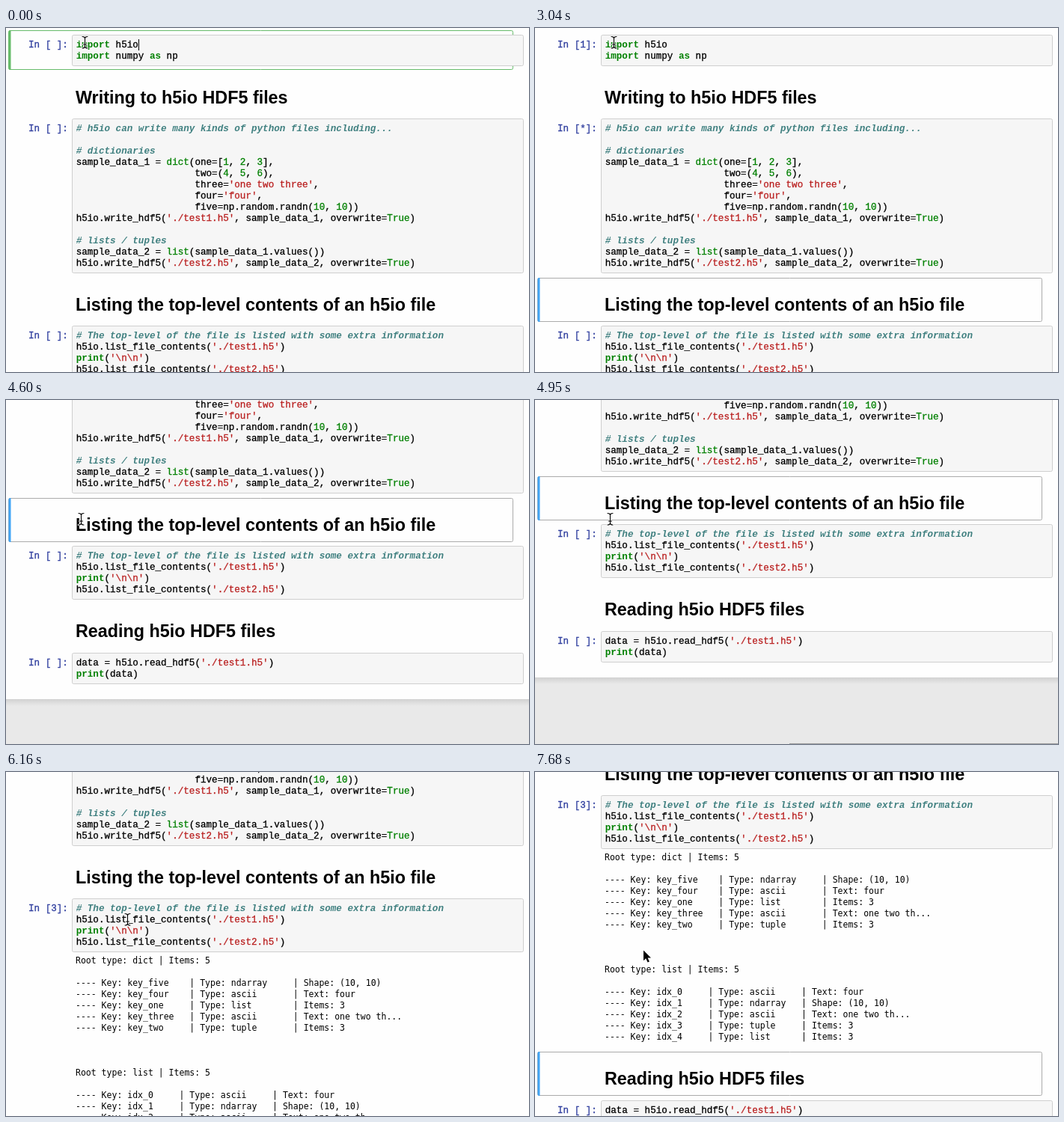
Write an HTML page with a canvas that moves like this. It is 699x460 px and loops after 8000 ms.

```html
<!DOCTYPE html>
<html lang="en">
<head>
<meta charset="utf-8">
<title>Notebook session</title>
<style>
  html, body { margin: 0; width: 100%; height: 100%; overflow: hidden; background: #fff; }
  canvas { display: block; }
</style>
</head>
<body>
<canvas id="stage" width="699" height="460"></canvas>
<script>
const ctx = document.getElementById('stage').getContext('2d');
const W = 699, H = 460, LOOP = 8000;
const LINE = 15, TEXT_X = 93, CODE_X = 93.7, PROMPT_X = 30;
const CODE = '12.6px "Liberation Mono", "Courier New", monospace';
const OUTPUT = '11.5px "DejaVu Sans Mono", monospace';
const HEADING = 'bold 23.35px "Liberation Sans", Arial, sans-serif';
const COMMAND = { bar: '#42a5f5', border: '#ababab' };
const EDIT = { bar: '#66bb6a', border: '#66bb6a' };

// Notebook content; tops and baselines are document coordinates.
const cells = [
  { top: 3, base: 26, code: String.raw`import h5io
import numpy as np` },
  { top: 56, base: 101, title: 'Writing to h5io HDF5 files' },
  { top: 115, base: 138, code: String.raw`# h5io can write many kinds of python files including...

# dictionaries
sample_data_1 = dict(one=[1, 2, 3],
                     two=(4, 5, 6),
                     three='one two three',
                     four='four',
                     five=np.random.randn(10, 10))
h5io.write_hdf5('./test1.h5', sample_data_1, overwrite=True)

# lists / tuples
sample_data_2 = list(sample_data_1.values())
h5io.write_hdf5('./test2.h5', sample_data_2, overwrite=True)` },
  { top: 334, base: 378, title: 'Listing the top-level contents of an h5io file' },
  { top: 393, base: 415, code: String.raw`# The top-level of the file is listed with some extra information
h5io.list_file_contents('./test1.h5')
print('\n\n')
h5io.list_file_contents('./test2.h5')` },
  { top: 476, base: 520, title: 'Reading h5io HDF5 files' },
  { top: 535, base: 558, code: String.raw`data = h5io.read_hdf5('./test1.h5')
print(data)` }
];
const LISTING = 4, PAGE_END = 603, FOOT_LINE = 691;
const OUTPUT_BASE = 485, OUTPUT_HEIGHT = 265;

const table = (rows, keyWidth, typeWidth) => rows.map(([key, type, info]) =>
  `---- Key: ${key}`.padEnd(keyWidth) + `| Type: ${type}`.padEnd(typeWidth) + `| ${info}`);

const output = [
  'Root type: dict | Items: 5', '',
  ...table([
    ['key_five', 'ndarray', 'Shape: (10, 10)'],
    ['key_four', 'ascii', 'Text: four'],
    ['key_one', 'list', 'Items: 3'],
    ['key_three', 'ascii', 'Text: one two th...'],
    ['key_two', 'tuple', 'Items: 3']
  ], 22, 20),
  '', '', '',
  'Root type: list | Items: 5', '',
  ...table([
    ['idx_0', 'ascii', 'Text: four'],
    ['idx_1', 'ndarray', 'Shape: (10, 10)'],
    ['idx_2', 'ascii', 'Text: one two th...'],
    ['idx_3', 'tuple', 'Items: 3'],
    ['idx_4', 'list', 'Items: 3']
  ], 20, 18)
];

// Timelines: each value holds until the next time.
const scrollSteps = [
  [0, 0], [4080, 5], [4220, 65], [4310, 131], [4430, 177], [4520, 203], [4610, 220],
  [4700, 230], [4790, 234], [4880, 233], [4950, 232], [5070, 231], [5210, 230], [5360, 229],
  [6700, 239], [6790, 284], [6880, 331], [6970, 358], [7050, 367]
];
const selectionSteps = [
  [0, [0, EDIT]], [1100, [1, COMMAND]], [2230, [2, COMMAND]], [3040, [3, COMMAND]],
  [5500, [4, EDIT]], [5980, [5, COMMAND]]
];
const promptSteps = {
  0: [[0, ' '], [1100, '*'], [1370, '1']],
  2: [[0, ' '], [3040, '*'], [3280, '2']],
  4: [[0, ' '], [5980, '*'], [6160, '3']],
  6: [[0, ' ']]
};
const caretSteps = [[0, true], [180, false], [690, true], [1100, false]];
const outputSteps = [[0, false], [6070, true]];
const pointerSteps = [
  [0, [105, 19]], [3280, [105, 58, true]], [3370, [104, 96, true]], [3460, [101, 141]],
  [3540, [100, 159]], [5070, [104, 161]], [5140, [120, 170]], [5210, [140, 183]],
  [5290, [156, 193]], [5360, [162, 197]], [7590, [157, 212]], [7680, [145, 238, true]]
];

function at(steps, t) {
  let value;
  for (const [time, v] of steps) if (time <= t) value = v;
  return value;
}

// A hairline stroke of the same colour gives the code its sturdier weight.
function text(str, x, y, font, color, weight = 0) {
  ctx.font = font;
  ctx.fillStyle = ctx.strokeStyle = color;
  ctx.fillText(str, x, y);
  if (!weight) return;
  ctx.lineWidth = weight;
  ctx.strokeText(str, x, y);
}

const TOKEN = /(#.*)|('[^']*')|\b(import|as|print)\b|\b(dict|list|True|\d+)\b|[^#'\w]+|\w+/g;

function codeLine(line, y) {
  let x = CODE_X;
  for (const [token, comment, string, keyword, builtin] of line.matchAll(TOKEN)) {
    const style = comment ? 'italic bold ' : keyword ? 'bold ' : '';
    const color = comment ? '#408080' : string ? '#ba2121' : keyword || builtin ? '#008000' : '#000';
    text(token, x, y, style + CODE, color, style ? 0 : 0.3);
    x += ctx.measureText(token).width;
  }
}

function selectionFrame(top, height, { bar, border }) {
  ctx.strokeStyle = border;
  ctx.lineWidth = 1;
  ctx.beginPath();
  ctx.roundRect(3.5, top + 0.5, 674, height - 1, 2);
  ctx.stroke();
  ctx.fillStyle = bar;
  ctx.beginPath();
  ctx.roundRect(3.5, top, 3, height, [2, 0, 0, 2]);
  ctx.fill();
}

function codeBox(cell, y, mark) {
  const lines = cell.code.split('\n');
  ctx.fillStyle = '#f6f6f6';
  ctx.strokeStyle = '#cfcfcf';
  ctx.lineWidth = 1;
  ctx.beginPath();
  ctx.roundRect(88.5, y - 16.5, 603, lines.length * LINE + 11, 2);
  ctx.fill();
  ctx.stroke();
  text(`In [${mark}]:`, PROMPT_X, y, CODE, '#303f9f', 0.3);
  lines.forEach((line, i) => codeLine(line, y + i * LINE));
}

function pageEnd(y) {
  if (y >= H) return;
  ctx.fillStyle = '#e9e9e9';
  ctx.fillRect(0, y, W, H - y);
  const shade = ctx.createLinearGradient(0, y, 0, y + 9);
  shade.addColorStop(0, 'rgba(87,87,87,.16)');
  shade.addColorStop(1, 'rgba(87,87,87,0)');
  ctx.fillStyle = shade;
  ctx.fillRect(0, y, W, 9);
}

function outlined(path, halo, ink) {
  ctx.lineJoin = ctx.lineCap = 'round';
  ctx.strokeStyle = '#fff';
  ctx.lineWidth = halo;
  ctx.stroke(path);
  ctx.strokeStyle = '#000';
  ctx.lineWidth = ink;
  if (ink) ctx.stroke(path);
}

const beam = new Path2D('M-3-7.5Q0-7.5 .5-5.5Q1-7.5 4-7.5M.5-5.5V6M-3 8Q0 8 .5 6Q1 8 4 8M-1.5 3H2.5');
const arrow = new Path2D('M0 .5V14.2L3.2 11.2L5.6 16.4L7.9 15.4L5.6 10.4H10Z');

function pointer([x, y, isArrow]) {
  ctx.save();
  ctx.translate(x, y);
  if (isArrow) {
    outlined(arrow, 2, 0);
    ctx.fillStyle = '#000';
    ctx.fill(arrow);
  } else {
    outlined(beam, 2.6, 1.1);
  }
  ctx.restore();
}

function draw(t) {
  const scroll = at(scrollSteps, t);
  const hasOutput = at(outputSteps, t);
  const [selected, mode] = at(selectionSteps, t);
  const shift = i => (hasOutput && i > LISTING ? OUTPUT_HEIGHT : 0) - scroll;

  ctx.fillStyle = '#fefefe';
  ctx.fillRect(0, 0, W, H);
  pageEnd(PAGE_END + shift(cells.length));
  ctx.fillStyle = '#a0a0a0';
  ctx.fillRect(340, FOOT_LINE + shift(cells.length), W - 340, 1);

  cells.forEach((cell, i) => {
    const dy = shift(i);
    if (i === selected) selectionFrame(cell.top + dy, cells[i + 1].top - cell.top, mode);
    if (cell.title) text(cell.title, TEXT_X, cell.base + dy, HEADING, '#000');
    else codeBox(cell, cell.base + dy, at(promptSteps[i], t));
  });
  if (hasOutput) {
    output.forEach((line, i) => text(line, TEXT_X, OUTPUT_BASE - scroll + i * LINE, OUTPUT, '#000'));
  }
  if (at(caretSteps, t)) {
    ctx.fillStyle = '#000';
    ctx.fillRect(177, 15, 1, 15);
  }
  pointer(at(pointerSteps, t));
}

const start = performance.now();
function tick() {
  draw((performance.now() - start) % LOOP);
  requestAnimationFrame(tick);
}
tick();
</script>
</body>
</html>
```
